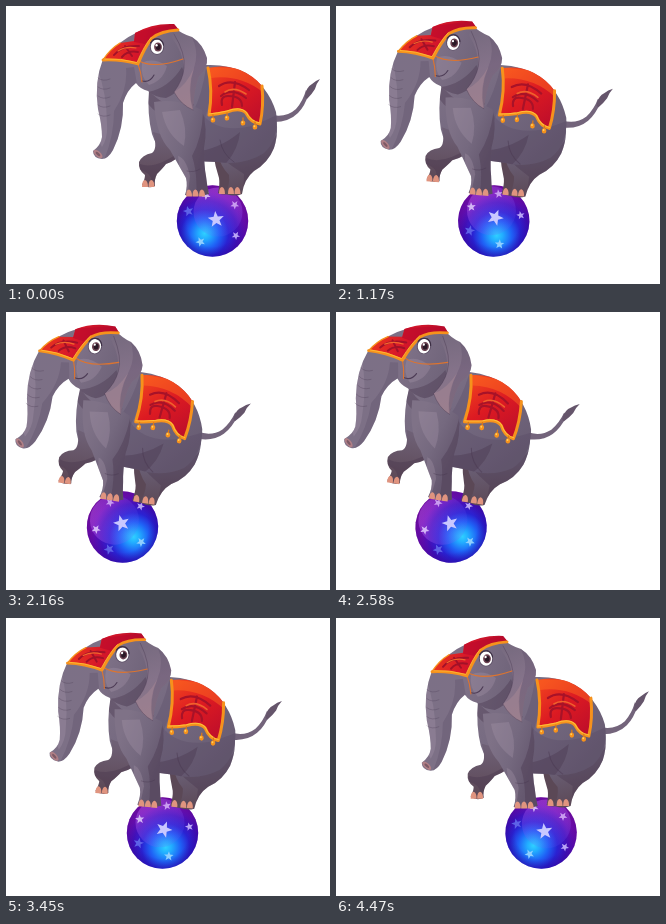
Animation, 324 px wide and 278 px high, one loop 4.5 s. Source, as an HTML page with a canvas:

```html
<!DOCTYPE html>
<html lang="en">
<head>
<meta charset="utf-8">
<title>Elephant on a ball</title>
<style>
html, body { margin: 0; width: 100%; height: 100%; overflow: hidden; background: #fff; }
canvas { display: block; width: 324px; height: 278px; }
</style>
</head>
<body>
<canvas id="stage"></canvas>
<script>
const LOOP = 4500, TURN = 2400, STEP = 30;
const BALL = { x: 206.5, y: 215, r: 35.7, travel: -100 };
const LEAN = Math.PI / 18, ROLL = -Math.PI / 2;
const canvas = document.getElementById('stage');
const ctx = canvas.getContext('2d');
const dpr = window.devicePixelRatio || 1;
canvas.width = 324 * dpr;
canvas.height = 278 * dpr;

function linear(x0, y0, x1, y1, ...colors) {
  const g = ctx.createLinearGradient(x0, y0, x1, y1);
  colors.forEach((c, i) => g.addColorStop(i / (colors.length - 1), c));
  return g;
}
function radial(x, y, r, stops) {
  const g = ctx.createRadialGradient(x, y, 0, x, y, r);
  stops.forEach(([at, c]) => g.addColorStop(at, c));
  return g;
}
function fill(d, color) {
  ctx.fillStyle = color;
  ctx.fill(new Path2D(d));
}
function line(d, color, width = 1) {
  ctx.strokeStyle = color;
  ctx.lineWidth = width;
  ctx.stroke(new Path2D(d));
}
function oval(x, y, rx, ry, color, turn = 0) {
  ctx.beginPath();
  ctx.ellipse(x, y, rx, ry, turn, 0, Math.PI * 2);
  ctx.fillStyle = color;
  ctx.fill();
}
// Fills a shape, then paints its shading clipped to it.
function shaded(d, color, shade) {
  fill(d, color);
  ctx.save();
  ctx.clip(new Path2D(d));
  shade();
  ctx.restore();
}

const SHADE = 'rgba(72,54,78,.38)', SOFT = 'rgba(72,56,84,.2)', LIGHT = 'rgba(170,152,172,.3)';
const CREASE = 'rgba(70,54,78,.45)', ORANGE = '#f6921c', GOLD = '#ffbf38';

function star(x, y, r, turn, color) {
  ctx.beginPath();
  for (let i = 0; i < 10; i++) {
    const a = turn + i * Math.PI / 5 - Math.PI / 2, q = i % 2 ? r * 0.42 : r;
    ctx.lineTo(x + q * Math.cos(a), y + q * Math.sin(a));
  }
  ctx.closePath();
  ctx.fillStyle = color;
  ctx.fill();
}

function ball() {
  const { r } = BALL;
  oval(0, 0, r, r, radial(-8, 12.5, 50, [
    [0, '#2fd0ff'], [.12, '#22adff'], [.3, '#1f62f6'], [.48, '#2a22d2'],
    [.66, '#4411bb'], [.84, '#780fb0'], [1, '#9110a4']
  ]));
  oval(0, 0, r, r, radial(0, 0, r, [[0, 'rgba(32,0,140,0)'], [.72, 'rgba(32,0,140,0)'], [1, 'rgba(32,0,140,.36)']]));
  oval(5.5, -9, 24.5, 24.5, linear(5, -33, 5, 15, 'rgba(190,95,240,.42)', 'rgba(110,90,250,.14)'));
  star(3.5, -1.5, 8.5, -.1, '#c9c8ff');
  [[202, 26, 5.5, '#5d62e8'], [256, 26.5, 4.8, '#d3b6f6'], [324, 27.5, 4.6, '#c99cf0'],
   [32, 27.5, 4.4, '#b9a5f6'], [120, 24, 5, '#8fd0ff']].forEach(([deg, dist, size, color]) => {
    const a = deg * Math.PI / 180;
    star(dist * Math.cos(a), dist * Math.sin(a), size, a, color);
  });
}

function toes(x, y, count) {
  for (let i = 0; i < count; i++) {
    const left = x + i * 6.5;
    fill(`M${left} ${y + 3} q0 -7 3 -7 q3 1 3 7Z`, '#e0947f');
  }
}

function tail() {
  fill('M266 109 Q280 112 290 103 Q297 95 300 84 L303 87 Q299 100 292 107 Q283 116 268 116Z', '#73647b');
  fill('M299 91 Q300 81 306 78 Q309 75 314 73 Q310 78 309 83 Q306 88 301 93Z', '#65556b');
}

function hindLegs() {
  fill('M207 146 L234 150 Q233 166 228 176 L226 187 Q218 190 212 187 Q214 178 213 172 Q209 160 207 146Z', '#5b4856');
  shaded('M214 122 Q240 90 266 100 Q275 120 268 142 Q262 157 248 165 Q238 173 236 188 Q229 191 220 188 Q224 178 223 169 Q214 160 211 145Z',
    linear(225, 108, 246, 186, '#756b80', '#6a5f75', '#5b4856'), () => {
      fill('M274 122 Q262 148 234 153 L213 150 Q225 160 238 168 L237 193 L280 165Z', SHADE);
      fill('M226 130 Q250 128 262 108 Q268 128 250 142 Q236 148 226 130Z', 'rgba(150,134,158,.18)');
    });
  toes(213, 185, 1);
  toes(222, 185, 2);
}

function torso() {
  shaded('M143 84 Q170 52 200 59 Q222 58 240 67 Q262 80 270 106 Q274 132 258 147 Q238 160 212 156 Q186 156 160 148 Q150 141 146 128 Q141 108 143 84Z',
    linear(150, 75, 240, 158, '#7d7085', '#73687f', '#685c72'), () => {
      fill('M196 108 Q212 128 246 120 Q266 112 276 106 L270 150 L205 165 L186 158 Q202 136 196 108Z', SOFT);
      fill('M188 146 Q214 143 234 126 Q232 148 213 164 L186 160Z', SHADE);
      fill('M143 84 Q160 106 188 98 Q184 112 166 114 Q150 108 142 98Z', SHADE);
      fill('M200 62 Q196 88 188 104 L198 116 Q206 90 208 62Z', SOFT);
    });
  line('M214 134 Q216 148 228 156', CREASE);
}

function frontLegs() {
  shaded('M147 126 Q166 130 182 142 Q172 154 160 158 Q157 162 151 168 Q148 174 149 180 Q142 183 136 179 Q139 173 139 169 Q132 164 133 156 Q136 149 146 147 Q152 143 147 126Z',
    linear(145, 130, 146, 178, '#6e6075', '#5c4856'), () => {
      fill('M134 158 Q150 164 176 144 L182 150 L156 168 L150 184 L144 182 Q150 168 134 164Z', SHADE);
    });
  toes(136, 178, 2);
  shaded('M148 96 Q172 92 196 104 Q202 122 198 142 Q198 160 200 170 Q201 180 203 188 Q190 192 179 189 Q182 180 180 172 Q172 158 164 144 Q150 130 148 96Z',
    linear(156, 120, 202, 134, '#7f7287', '#75697f', '#65586f'), () => {
      fill('M197 106 Q196 132 186 150 Q192 168 190 193 L206 193 L204 119Z', SHADE);
      fill('M156 106 Q160 128 178 140 Q182 122 174 104Z', LIGHT);
      fill('M172 150 Q180 152 184 170 L182 186 L176 186Z', LIGHT);
    });
  line('M181 165 Q188 167 194 163', CREASE, .8);
  toes(180, 187.5, 3);
}

function saddle() {
  shaded('M202 62 Q219 58 234 64 Q248 70 256 80 Q258 100 254 118 Q245 117 240 107 Q234 101 221 106 Q212 108 203 109 Q207 84 202 62Z',
    linear(206, 64, 250, 114, '#f0421f', '#dc1a22', '#c00f2a'), () => {
      fill('M202 61 L236 62 L260 80 L258 87 Q234 68 205 72Z', 'rgba(255,112,32,.45)');
      line('M213 80 Q226 71 243 84 M215 90 Q226 81 240 92 M229 76 L226 101 M216 99 Q214 90 222 90 Q236 90 236 100', '#a81228', 2.2);
      line('M219 86 Q228 80 240 88', '#f0602c', 1.6);
    });
  line('M202 62 Q207 84 203 109 Q212 108 221 106 Q234 101 240 107 Q245 117 254 118 Q258 100 256 80', ORANGE, 3);
  line('M203 108 Q212 107 221 105 Q234 100 240 106 Q245 116 254 117', GOLD, 1);
  [[207, 114], [221, 112], [237, 117], [249, 121]].forEach(([x, y]) => {
    line(`M${x} ${y - 5} V${y}`, '#d9791a', 1.3);
    oval(x, y, 2.3, 2.6, ORANGE);
    oval(x - .6, y - .8, .9, 1, '#ffd160');
  });
}

function ear() {
  shaded('M169 22 Q176 28 186 31 Q197 38 201 52 Q202 62 193 70 Q188 82 187 104 Q175 99 168 86 Q177 74 178 62 Q177 46 166 32Z',
    linear(171, 32, 195, 94, '#786b80', '#85738a', '#8c7687'), () => {
      fill('M184 28 Q194 44 188 62 Q180 82 187 106 L207 91 L208 30Z', SOFT);
      fill('M168 86 Q180 80 188 62 Q181 84 187 104 L176 104Z', 'rgba(176,140,152,.4)');
    });
  line('M168 28 Q180 48 178 62 Q177 74 168 86 Q175 99 187 104', CREASE, .8);
}

function head() {
  shaded('M97 53 Q114 34 130 27 Q150 16 170 21 Q182 44 180 66 Q176 86 160 92 Q148 91 142 85 Q134 83 130 77 Q121 84 117 97 Q118 122 107 144 Q102 153 96 153 Q87 152 87 145 Q95 139 96 131 Q96 119 92 103 Q88 76 97 53Z',
    linear(91, 65, 170, 85, '#7c7086', '#7d7086', '#70647a'), () => {
      fill('M120 62 Q122 84 108 105 Q108 130 98 154 L111 147 L124 95 L131 78 L128 61Z', SOFT);
      fill('M91 62 Q101 87 101 119 Q102 131 96 141 L86 121Z', LIGHT);
      fill('M142 86 Q163 82 176 61 L183 77 L160 98Z', SHADE);
      fill('M136 57 Q147 51 161 60 Q157 75 143 79 Q134 71 136 57Z', LIGHT);
    });
  for (let y = 72; y < 112; y += 9) line(`M92 ${y} Q97 ${y + 4} 104 ${y + 1}`, CREASE, .6);
  oval(92, 148, 5.6, 2.6, '#b07f86', .75);
  oval(92, 148, 3, 1.2, '#7d5a66', .75);
  line('M136 75 Q144 77 148 69', '#4d3c56', 1.1);
}

function eye() {
  oval(151, 40.5, 7.2, 8.2, '#5d4f66');
  oval(151, 40.8, 6.2, 7.2, '#fff');
  oval(152, 41, 3.9, 4.5, '#6b4150');
  oval(152.2, 41, 2.4, 2.9, '#2a1826');
  oval(150.6, 39.2, 1.1, 1.2, '#fff');
  line('M144.5 37 Q147 32 153 33 Q157 35 157.5 39', '#3c2f44', 1.1);
}

function headdress() {
  line('M132 58 Q135 66 136 76 M133 55 Q148 63 177 53', '#dc7430', 1.1);
  shaded('M97 54 Q104 43 114 37 L128 35 L129 27 Q146 17 168 18 L173 24 Q155 25 146 32 Q139 41 132 58 Q114 53 97 54Z',
    linear(105, 32, 158, 48, '#e8331f', '#d6172a', '#b80f2a'), () => {
      fill('M129 26 L172 17 L174 25 Q150 22 139 38 L128 36Z', 'rgba(185,8,44,.6)');
      line('M108 49 Q116 39 133 40 M116 51 Q122 44 132 46 M119 40 L126 50', '#a21128', 2);
      line('M112 45 Q120 40 130 42', '#f2672c', 1.2);
    });
  line('M97 54 Q114 53 132 58 Q139 41 146 32 Q155 25 172 24', ORANGE, 2.8);
  line('M97 54 Q104 43 114 37', ORANGE, 1.4);
  line('M99 53 Q114 52 131 56.5 Q138 40 145 31.5', GOLD, .8);
}

function elephant() {
  [tail, hindLegs, torso, frontLegs, saddle, head, ear, headdress, eye].forEach(part => part());
}

function render(now) {
  const t = Math.floor((now % LOOP) / STEP) * STEP;
  const swing = t < TURN ? t / TURN : (LOOP - t) / (LOOP - TURN);
  ctx.setTransform(dpr, 0, 0, dpr, 0, 0);
  ctx.fillStyle = '#fff';
  ctx.fillRect(0, 0, 324, 278);
  ctx.lineCap = ctx.lineJoin = 'round';
  ctx.translate(BALL.x + BALL.travel * swing, BALL.y);
  ctx.save();
  ctx.rotate(ROLL * swing);
  ball();
  ctx.restore();
  ctx.rotate(LEAN * swing);
  ctx.translate(-BALL.x, -BALL.y);
  elephant();
}

const start = performance.now();
function tick() {
  render(performance.now() - start);
  requestAnimationFrame(tick);
}
tick();
</script>
</body>
</html>
```
